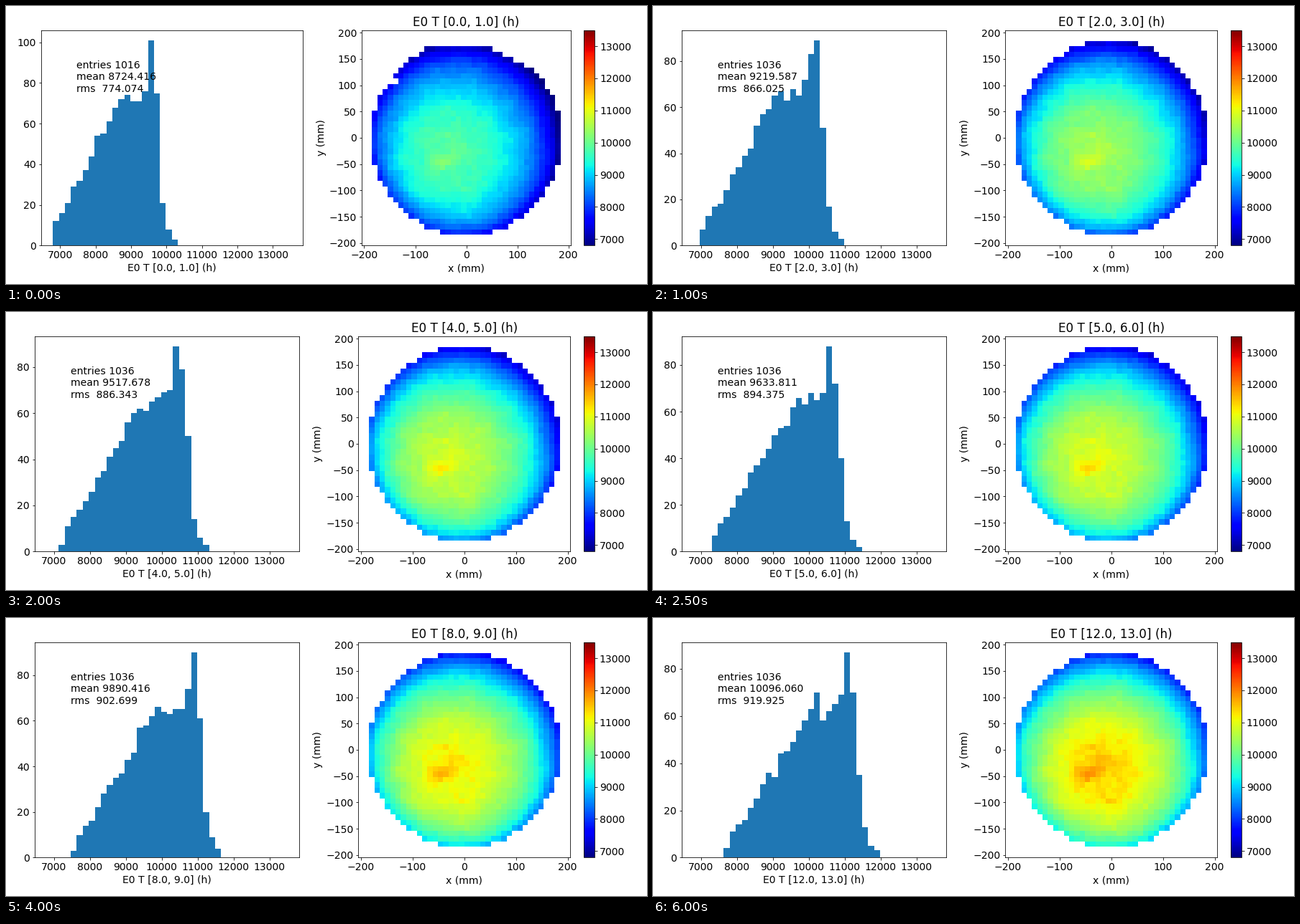
Write a matplotlib script that moves like this. It is 892 px wide and 388 px high and loops after 6.5 s.

```python
import numpy as np
import matplotlib.pyplot as plt
from matplotlib.animation import FuncAnimation
from matplotlib.ticker import MultipleLocator
from numpy.polynomial import Polynomial

W, H, DPI = 892, 388, 72
STEPS, INTERVAL = 13, 500
E_MIN, E_MAX, BINS = 6800, 13500, 40
EDGES = np.linspace(E_MIN, E_MAX, BINS + 1)
HALF, CELLS = 205, 40

# Layout in pixels from the lower left corner
BOTTOM, TOP = 53.65, 354.4
RIGHT, GAP = 858.93, 82.21
LEFT, DIGIT = 39.81, 8.91

plt.rcParams.update({"font.family": "DejaVu Sans", "font.size": 14})

# Mean and rms follow curves through their values at every second hour.
hours = np.arange(0, STEPS, 2)
mean_at = Polynomial.fit(hours, [8724.416, 9219.587, 9517.678, 9733.960,
                                 9890.416, 10001.738, 10096.060], 6)
rms_at = Polynomial.fit(hours, [774.074, 866.025, 886.343, 899.690,
                                902.699, 916.710, 919.925], 6)
PEAKS = [101, 98, 89, 97, 89, 88, 97, 90, 90, 91, 89, 87, 87]

# One spectrum shape serves every hour, in units of rms around the mean.
SHAPE = [(-2.65, 0), (-2.58, 4), (-2.4, 11), (-2, 18), (-1.5, 31), (-1, 42),
         (-0.5, 56), (0, 64), (0.8, 68), (1.1, 92), (1.3, 68), (1.42, 38),
         (1.5, 19), (1.75, 6), (2, 2)]


def spectrum(z):
    return np.interp(z, *zip(*SHAPE), left=0, right=0)


z_axis = np.linspace(SHAPE[0][0], SHAPE[-1][0], 600)
z_cum = np.cumsum(spectrum(z_axis))
z_cum /= z_cum[-1]

# Detector cells, in units of one cell and in mm
grid = np.arange(CELLS) - CELLS / 2 + 0.5
gx, gy = np.meshgrid(grid, grid)
pitch = 2 * HALF / CELLS
mx, my = gx * pitch, gy * pitch
disc = gx**2 + gy**2 < 330

rng = np.random.default_rng(5)
grain = rng.normal(0, 0.018, disc.shape)
lumps = rng.normal(0, 0.06, disc.shape)
lumps = sum(np.roll(lumps, (a, b), (0, 1))
            for a in (-1, 0, 1) for b in (-1, 0, 1)) / 9


def live_cells(i):
    """The first hour still lacks the upper right rim and a small notch."""
    if i:
        return disc
    notch = (gy == 10.5) & (gx < -13)
    return disc & (gy < 17) & (gx + 2 * gy < 38) & ~notch


def brightness(i):
    """Off-centre dome with a dark rim and a hot spot."""
    a = i / (STEPS - 1)
    dome = (np.hypot(mx + 30 - 14 * a, my + 32 + 6 * a) / 200) ** 2.2
    rim = (0.45 - 0.15 * a) * (np.hypot(mx, my) / 185) ** 8
    spot = 0.14 * np.exp(-((mx + 43) / 24) ** 2 - ((my + 45) / 14) ** 2)
    flicker = np.random.default_rng(100 + i).normal(0, 0.007, disc.shape)
    return spot - dome - rim + grain + lumps + flicker


def energy_map(i):
    """Spread the spectrum over the cells, ranked by brightness."""
    live = live_cells(i)
    rank = np.argsort(np.argsort(brightness(i)[live]))
    z = np.interp((rank + 0.5) / rank.size, z_cum, z_axis)
    field = np.ma.masked_all(disc.shape)
    field[live] = mean_at(i) + rms_at(i) * z
    return field


def bar_heights(i, entries):
    centers = (EDGES[:-1] + EDGES[1:]) / 2
    expected = spectrum((centers - mean_at(i)) / rms_at(i))
    expected *= entries / expected.sum()
    noise = np.random.default_rng(40 + i).normal(1, 0.05, BINS)
    heights = np.minimum(np.round(expected * noise), PEAKS[i])
    heights[expected.argmax()] = PEAKS[i]
    return heights


def place(ax, left, width):
    ax.set_position([left / W, BOTTOM / H, width / W, (TOP - BOTTOM) / H])


def arrange(wide):
    """A three-digit tick label narrows both panels."""
    left = LEFT + DIGIT * wide
    width = (RIGHT - left - GAP) / 2
    place(hist_ax, left, width)
    place(map_ax, RIGHT - width, 0.8 * width)
    place(bar_ax, RIGHT - 0.15 * width, (TOP - BOTTOM) / 20)


fig = plt.figure(figsize=(W / DPI, H / DPI), dpi=DPI, facecolor="white")
hist_ax, map_ax, bar_ax = (fig.add_axes([0.1 + 0.3 * k, 0.1, 0.2, 0.8])
                           for k in range(3))

bars = hist_ax.bar(EDGES[:-1], np.zeros(BINS), np.diff(EDGES), align="edge",
                   color="#1f77b4")
margin = 0.05 * (E_MAX - E_MIN)
hist_ax.set_xlim(E_MIN - margin, E_MAX + margin)
hist_ax.xaxis.set_major_locator(MultipleLocator(1000))
hist_ax.yaxis.set_major_locator(MultipleLocator(20))
note = hist_ax.text(E_MIN + 0.1 * (E_MAX - E_MIN), 0, "")

lines = np.linspace(-HALF, HALF, CELLS + 1)
mesh = map_ax.pcolormesh(lines, lines, energy_map(0), cmap="jet",
                         vmin=E_MIN, vmax=E_MAX)
map_ax.set(xlim=(-HALF, HALF), ylim=(-HALF, HALF),
           xlabel="x (mm)", ylabel="y (mm)")
map_ax.xaxis.set_major_locator(MultipleLocator(100))
map_ax.yaxis.set_major_locator(MultipleLocator(50))
fig.colorbar(mesh, cax=bar_ax, ticks=np.arange(7000, 13001, 1000))


def update(i):
    field = energy_map(i)
    entries = field.count()
    for bar, height in zip(bars, bar_heights(i, entries)):
        bar.set_height(height)
    mesh.set_array(field)

    y_max = 1.05 * PEAKS[i]
    hist_ax.set_ylim(0, y_max)
    arrange(y_max >= 100)

    label = f"E0 T [{i:.1f}, {i + 1:.1f}] (h)"
    hist_ax.set_xlabel(label)
    map_ax.set_title(label)
    note.set_y(0.75 * PEAKS[i])
    note.set_text(f"entries {entries}\nmean {mean_at(i):.3f}\n"
                  f"rms  {rms_at(i):.3f}")
    return []


anim = FuncAnimation(fig, update, frames=STEPS, interval=INTERVAL,
                     init_func=lambda: update(0), repeat=True,
                     repeat_delay=0, blit=False)
plt.show()
```
